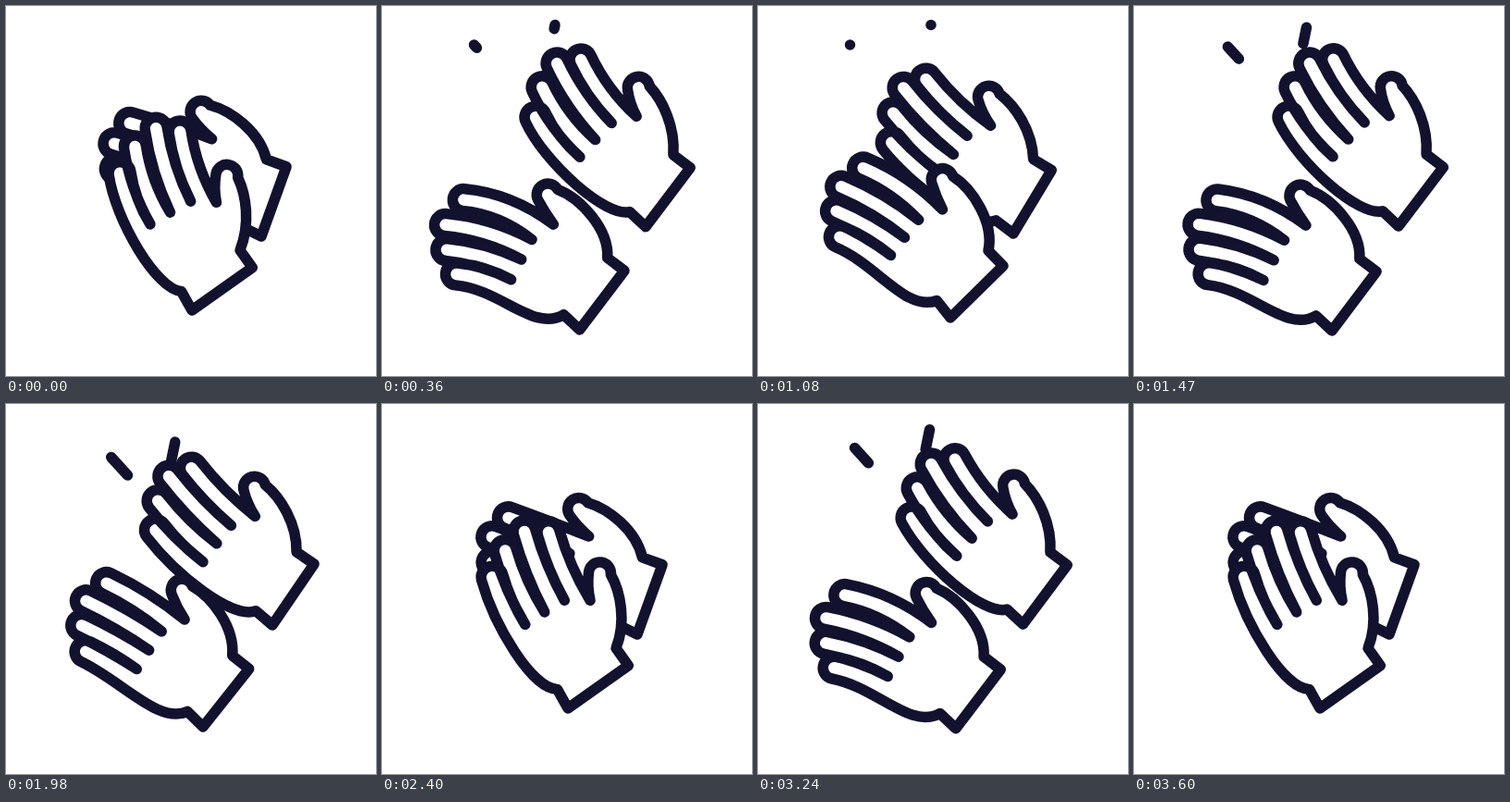
An HTML page with a canvas that plays this animation: 400x400 px, repeating every 3630 ms.

```html
<!DOCTYPE html>
<html lang="en">
<head>
<meta charset="utf-8">
<title>Clapping hands</title>
<style>
  html, body { margin: 0; width: 100%; height: 100%; overflow: hidden; background: #fff; }
  canvas { display: block; }
</style>
</head>
<body>
<canvas id="stage" width="400" height="400"></canvas>
<script>
const ctx = document.getElementById('stage').getContext('2d');
const INK = '#12122e', STEP = 30, FRAMES = 121, CLAP = 20;
const RADIUS = 12, RAD = Math.PI / 180;

// Hand points in wrist space (y up): x, y bent back, then x, y bent forward.
const TIPS = [[-31, 143, 22, 166], [-16, 167, 52, 180], [5, 184, 82, 183], [38, 184, 101, 165]];
const GAPS = [[-1, 92, 17, 102], [23, 96, 42, 100], [47, 100, 67, 97], [74, 91, 89, 80]];
const THUMB = [96, 115, 115, 97];
const HEEL = [-32, 38, -18, 40];
const BALL = [114, 85, 120, 68];

// Keys over one clap: time, wrist x, wrist y, angle, bend.
const BACK = [
  [0, 276, 249, -70.2, .46], [120, 286, 245, -69.3, .61], [180, 288, 239, -55.7, .84],
  [270, 286, 238, -52.8, 1], [330, 286, 238, -52.5, 1.02], [480, 276, 246, -58.9, .89],
  [600, 276, 249, -70.2, .53]
];
const FRONT = [
  [0, 201, 329, -35.3, 1], [120, 205, 338, -39.9, .7], [180, 213, 349, -51.6, .3],
  [270, 214, 351, -53, 0], [330, 214, 351, -53.4, -.04], [480, 208, 337, -44.5, .13],
  [600, 201, 329, -35.3, .87]
];
// Spark keys: time, distance of head and tail from the far end.
const SPARK = [[0, 60, 60], [120, 29.7, 56], [180, 21, 47.5], [270, 2.8, 20.5], [330, 0, 8], [420, 0, 0], [600, 0, 0]];

// Monotone cubic interpolation of every column after the time.
function sample(keys, time) {
  let i = 0;
  while (i < keys.length - 2 && time > keys[i + 1][0]) i++;
  const a = keys[i], b = keys[i + 1], span = b[0] - a[0], u = (time - a[0]) / span;
  return a.slice(1).map((from, n) => {
    const col = n + 1;
    const secant = k => keys[k] && keys[k + 1]
      ? (keys[k + 1][col] - keys[k][col]) / (keys[k + 1][0] - keys[k][0]) : 0;
    const slope = k => {
      const p = secant(k - 1), q = secant(k);
      return p * q > 0 ? 2 * p * q / (p + q) : 0;
    };
    const ease = u * u * (3 - 2 * u);
    return from + (b[col] - from) * ease
      + span * u * (1 - u) * ((1 - u) * slope(i) - u * slope(i + 1));
  });
}

function drawHand([x, y, angle, bend]) {
  const at = p => [p[0] + (p[2] - p[0]) * bend, p[1] + (p[3] - p[1]) * bend];

  // A rounded tip with the points where its two sides begin.
  const digit = (point, lean) => {
    const [cx, cy] = at(point), dx = Math.sin(lean), dy = Math.cos(lean);
    const side = s => [cx + s * RADIUS * dy, cy - s * RADIUS * dx];
    const below = ([px, py], k) => [px - dx * k, py - dy * k];
    return {
      left: side(-1), right: side(1), below,
      cap: () => ctx.arc(cx, cy, RADIUS, Math.PI - lean, -lean, true),
      handle: (p, q) => below(p, Math.hypot(p[0] - q[0], p[1] - q[1]) / 2)
    };
  };
  const lean = (-30 + 57 * bend) * RAD;
  const fingers = TIPS.map(tip => digit(tip, lean));
  const thumb = digit(THUMB, (25 + 20 * bend) * RAD);

  ctx.save();
  ctx.translate(x, y);
  ctx.rotate(angle * RAD);
  ctx.scale(1, -1);
  ctx.beginPath();
  ctx.moveTo(80, 23);
  ctx.lineTo(80, 0);
  ctx.lineTo(0, 0);
  ctx.lineTo(2.5, 23.5);
  ctx.bezierCurveTo(...at(HEEL), ...fingers[0].below(fingers[0].left, 50), ...fingers[0].left);
  fingers.forEach((finger, i) => {
    const gap = at(GAPS[i]), next = fingers[i + 1] || thumb;
    finger.cap();
    ctx.quadraticCurveTo(...finger.handle(finger.right, gap), ...gap);
    ctx.quadraticCurveTo(...next.handle(next.left, gap), ...next.left);
  });
  thumb.cap();
  ctx.bezierCurveTo(...at(BALL), 106, 40, 80, 23);
  ctx.closePath();
  ctx.fill();
  ctx.stroke();
  ctx.restore();
}

function drawSpark(x, y, dx, dy, head, tail) {
  ctx.beginPath();
  ctx.moveTo(x + dx * head, y + dy * head);
  ctx.lineTo(x + dx * tail + .01, y + dy * tail);
  ctx.stroke();
}

function draw(now) {
  const frame = Math.floor(now / STEP) % FRAMES;
  // The first frame alone shows the start pose; each clap ends on its last key.
  const time = frame ? ((frame - 1) % CLAP + 1) * STEP : 0;
  ctx.clearRect(0, 0, 400, 400);
  ctx.strokeStyle = INK;
  ctx.fillStyle = '#fff';
  ctx.lineWidth = 11.5;
  ctx.lineCap = ctx.lineJoin = 'round';
  if (time > 0 && time < 540) {
    const [head, tail] = sample(SPARK, time);
    drawSpark(99.5, 42, .675, .738, head, tail);
    drawSpark(187, 20.5, -.2, .98, head, tail);
  }
  drawHand(sample(BACK, time));
  drawHand(sample(FRONT, time));
}

let start;
function tick(now) {
  start ??= now;
  draw(now - start);
  requestAnimationFrame(tick);
}
draw(0);
requestAnimationFrame(tick);
</script>
</body>
</html>
```
